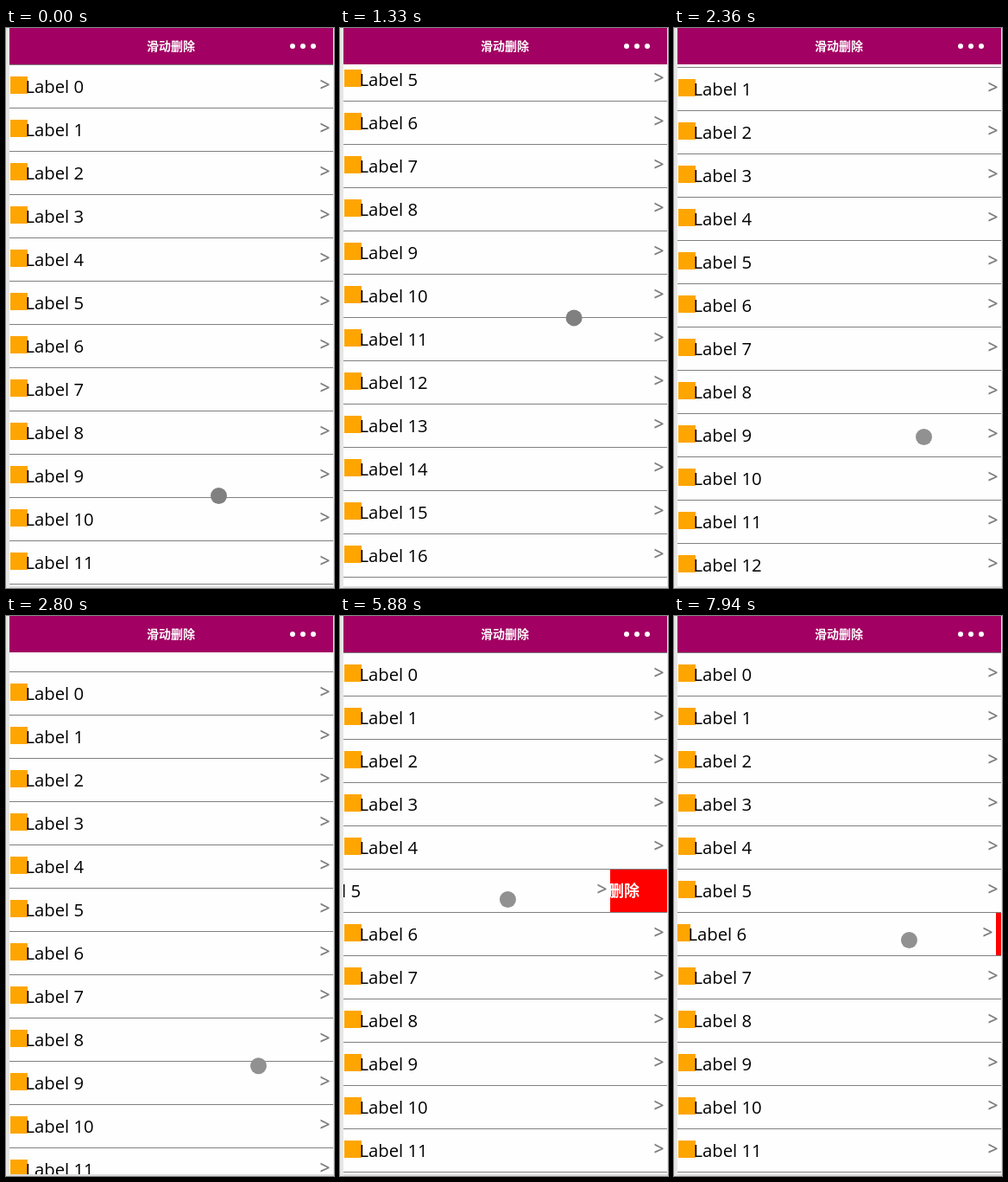
Animation of 380x647 px, one loop 8 s. Source, as an HTML page with a canvas:

```html
<!DOCTYPE html>
<html lang="zh">
<head>
<meta charset="utf-8">
<title>滑动删除</title>
<style>
html, body { margin: 0; width: 100%; height: 100%; overflow: hidden; background: #e6e6e6; }
canvas { display: block; }
</style>
</head>
<body>
<canvas id="stage" width="380" height="647"></canvas>
<script>
const ctx = document.getElementById('stage').getContext('2d');
const LOOP = 8000, START = 297, STEP = 146.8;
const LEFT = 4, TOP = 42, WIDTH = 375, BOTTOM = 645, ROW = 50, BUTTON = 102;
const CJK = '"Noto Sans CJK SC", "Noto Sans CJK", sans-serif';
const LATIN = '"Open Sans", sans-serif';

// Finger path as [step, x, y]; the slide of a dragged row is added to x
const path = [
  [-1, 246, 540], [3, 260, 366], [5, 267, 288], [10, 276, 404], [14, 289, 472],
  [18, 293, 535], [23, 285, 323], [25, 285, 323], [29, 260, 327], [31, 260, 383],
  [34, 260, 327], [38, 260, 327], [43, 284, 333], [45, 274, 377], [52, 278, 374]
];
const presses = [[0, 5], [8, 18], [24, 28], [36, 42], [47, 52]];

const part = (s, a, b) => Math.min(1, Math.max(0, (s - a) / (b - a)));
const ease = (s, a, b) => { const p = part(s, a, b); return p * p * (3 - 2 * p); };
const bump = (s, a, b) => Math.sin(Math.PI * part(s, a, b));

// Flick up, drag back down, then a small rubber band past the top
const scrollAt = s =>
  Math.round(270 * (ease(s, -1, 6.5) - ease(s, 5.5, 17.05)) - 24 * bump(s, 14, 22));

// Row 5 opens and closes, row 6 is pulled a little and let back
function slideAt(n, s) {
  if (n === 5) return -BUTTON * (ease(s, 23, 27) - ease(s, 35.2, 42.2));
  if (n === 6) return -60 * bump(s, 46, 52.2);
  return 0;
}

function fingerAt(s) {
  const j = Math.max(1, path.findIndex(k => k[0] >= s));
  const [a, ax, ay] = path[j - 1], [b, bx, by] = path[j];
  const p = part(s, a, b);
  return [ax + (bx - ax) * p + slideAt(5, s) + slideAt(6, s), ay + (by - ay) * p];
}

function rect(color, x, y, w, h) {
  ctx.fillStyle = color;
  ctx.fillRect(x, y, w, h);
}

function disc(color, x, y, r) {
  ctx.fillStyle = color;
  ctx.beginPath();
  ctx.arc(x, y, r, 0, Math.PI * 2);
  ctx.fill();
}

function text(str, x, y, font, color, align = 'left', base = 'alphabetic') {
  ctx.font = font;
  ctx.fillStyle = color;
  ctx.textAlign = align;
  ctx.textBaseline = base;
  ctx.fillText(str, x, y);
}

function drawRow(n, y, slide) {
  if (slide < 0) {
    rect('#f00', LEFT + WIDTH - BUTTON, y + 1, BUTTON, ROW - 1);
    text('删除', 329, y + 25, 'bold 18px ' + CJK, '#fff', 'center', 'middle');
  }
  ctx.save();
  ctx.translate(slide, 0);
  rect('#fefefe', LEFT, y + 1, WIDTH, ROW - 1);
  rect('#ffa500', 5, y + 14, 20, 20);
  text('Label ' + n, 22.5, y + 33, '20.3px ' + LATIN, '#000');
  text('>', 369.5, y + 31, '600 21px ' + LATIN, '#7f7f7f', 'center');
  ctx.restore();
  rect('#808080', LEFT, y, WIDTH, 1);
}

function drawList(s) {
  const scroll = scrollAt(s);
  const first = Math.max(0, Math.floor(scroll / ROW));
  ctx.save();
  ctx.beginPath();
  ctx.rect(LEFT, TOP, WIDTH, BOTTOM - TOP);
  ctx.clip();
  rect('#fefefe', LEFT, TOP, WIDTH, BOTTOM - TOP);
  for (let n = first; n < first + 14; n++) {
    drawRow(n, TOP + n * ROW - scroll, Math.round(slideAt(n, s)));
  }
  ctx.restore();
}

function drawHeader() {
  rect('#a20062', LEFT, 0, WIDTH, TOP);
  text('滑动删除', 191, 21, 'bold 14px ' + CJK, '#fff', 'center', 'middle');
  for (let i = 0; i < 3; i++) disc('#fff', 332 + 12 * i, 21, 3);
}

function draw(t) {
  const s = Math.floor((t - START) / STEP);
  rect('#e6e6e6', 0, 0, 380, 647);
  rect('#dcdcdc', LEFT, BOTTOM, 376, 2);
  drawList(s);
  drawHeader();
  const [x, y] = fingerAt(s);
  const down = presses.some(([a, b]) => s >= a && s <= b);
  disc(down ? '#919191' : '#808080', x + 0.5, y + 0.5, 9.5);
}

const begin = performance.now();
function frame() {
  draw((performance.now() - begin) % LOOP);
  requestAnimationFrame(frame);
}
frame();
</script>
</body>
</html>
```
